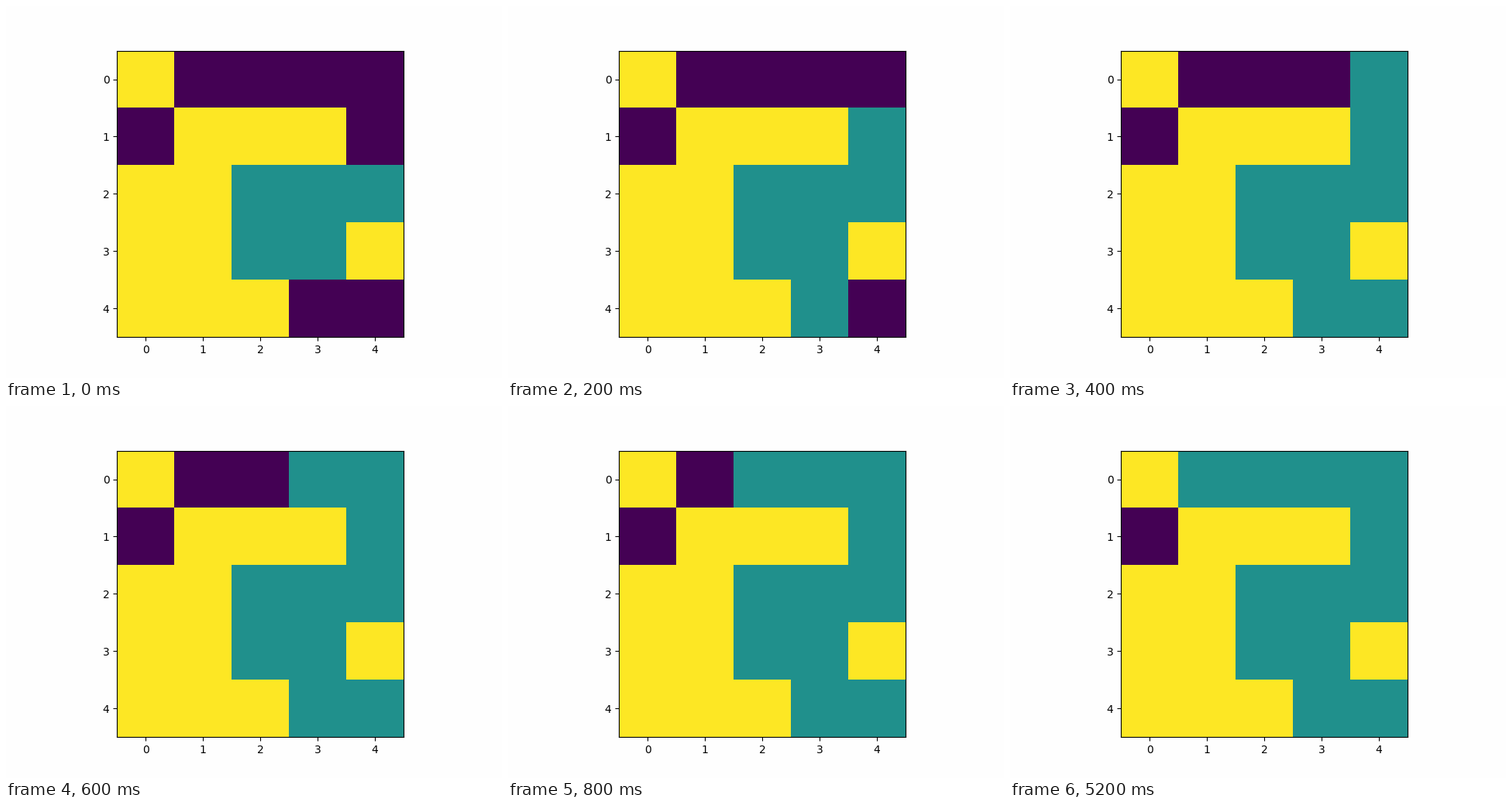
A matplotlib script for the animation above (8000 ms loop, 640 px wide and 480 px high).

```python
import numpy as np
import matplotlib.pyplot as plt
from matplotlib.animation import FuncAnimation

EMPTY, WATER, WALL = range(3)
SIZE = 5
STEP_MS = 200
FRAMES = 40
HEAD_START = 2  # steps already flooded when the loop begins


def make_room():
    """Empty room with walls and a spring in the middle."""
    grid = np.full((SIZE, SIZE), EMPTY)
    grid[0, 0] = WALL
    grid[1, 1:-1] = WALL
    grid[2:, :2] = WALL
    grid[-1, 2] = WALL
    grid[3, -1] = WALL
    grid[SIZE // 2, SIZE // 2] = WATER
    return grid


def spread(grid):
    """Fill every empty cell that shares an edge with water."""
    wet = np.pad(grid == WATER, 1)
    near = wet[:-2, 1:-1] | wet[2:, 1:-1] | wet[1:-1, :-2] | wet[1:-1, 2:]
    return np.where((grid == EMPTY) & near, WATER, grid)


def flooded(step):
    grid = make_room()
    for _ in range(HEAD_START + step):
        grid = spread(grid)
    return grid


fig, ax = plt.subplots(figsize=(6.4, 4.8), dpi=100, facecolor="#fefefe")
image = ax.imshow(flooded(0), cmap="viridis", vmin=EMPTY, vmax=WALL)
ax.set_xticks(range(SIZE))
ax.set_yticks(range(SIZE))


def update(step):
    image.set_data(flooded(step))
    return [image]


anim = FuncAnimation(fig, update, frames=FRAMES, interval=STEP_MS,
                     repeat=True, repeat_delay=0)
plt.show()
```
